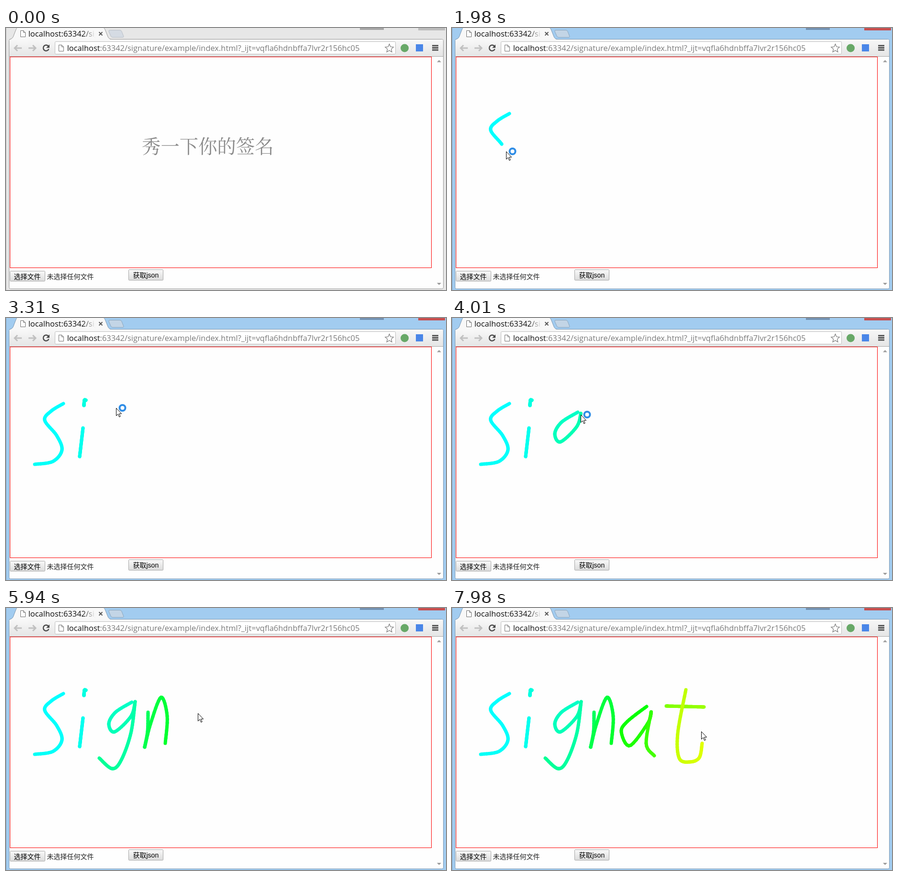
These frames come from a looping animation (920 by 548 pixels, 8000 ms). An HTML page with a canvas:

```html
<!DOCTYPE html>
<html lang="zh">
<head>
<meta charset="utf-8">
<title>Signature pad</title>
<style>
  html, body { margin: 0; width: 100%; height: 100%; overflow: hidden; }
  #stage {
    --frame: #e7e7e7; --edge: #999; --side: #c4c4c4;
    --min: #a6a6a6; --close: #bcbcbc; --plus: #d5dbe3; --plusEdge: #b9bfc7;
    position: relative; width: 920px; height: 548px; overflow: hidden; background: var(--frame);
  }
  #stage.active {
    --frame: #a2ccf0; --edge: #7f9ab3; --side: #86a9c8;
    --min: #7392b3; --close: #c75050; --plus: #c3d5e6; --plusEdge: #8ba5bd;
  }
  #stage.active #hint { display: none; }
  svg, canvas { position: absolute; left: 0; top: 0; }
  .ui { font: 16.46px "Open Sans", "Noto Sans", sans-serif; }
  .form { font: 14px "Liberation Sans", "Noto Sans CJK SC", sans-serif; }
  #hint { font: 39.4px "Noto Serif CJK SC", "Noto Sans CJK SC", serif; fill: #8a8a8a; }
  .btn { fill: url(#btnFill); stroke: #a5a5a5; }
</style>
</head>
<body>
<div id="stage">
  <svg width="920" height="548" viewBox="0 0 920 548">
    <defs>
      <linearGradient id="bar" x2="0" y2="1">
        <stop offset="0" stop-color="#f8f8f8"/><stop offset="1" stop-color="#e5e5e5"/>
      </linearGradient>
      <linearGradient id="btnFill" x2="0" y2="1">
        <stop offset="0" stop-color="#f9f9f9"/><stop offset="1" stop-color="#dcdcdc"/>
      </linearGradient>
      <linearGradient id="fade" gradientUnits="userSpaceOnUse" x1="160" x2="187" y1="0" y2="0">
        <stop offset="0" stop-color="#111"/><stop offset="1" stop-color="#111" stop-opacity="0"/>
      </linearGradient>
      <clipPath id="tabClip"><rect x="40" width="147" height="24"/></clipPath>
      <g id="page" fill="#fff" stroke="#707070">
        <path d="M.5.5h6l4 4v9h-10z"/><path d="M6.5.5v4h4" fill="none"/>
      </g>
      <path id="arrow" d="M0 0h15M6-6L0 0l6 6" fill="none" stroke="#c0c0c0" stroke-width="3"/>
    </defs>

    <rect width="1" height="548" style="fill:var(--side)"/>
    <rect x="740" width="50" height="4" style="fill:var(--min)"/>
    <rect x="862" width="56" height="5" style="fill:var(--close)"/>

    <!-- window, toolbar and tab -->
    <rect x="6.5" y="23.5" width="908" height="522" rx="3" fill="#fefefe" style="stroke:var(--edge)"/>
    <path d="M7 59V27q0-3 3-3h901q3 0 3 3v32z" fill="url(#bar)"/>
    <path d="M7 24.5C14 23 15 20 17 14L21 3Q22 0 24 -1H203Q206 0 207 3L213 18Q215 23 220 24.5z" fill="#f8f8f8"/>
    <path d="M7 24C14 22 15 19 17 13L21 3Q22 0 24 -1M203 -1Q206 0 207 3L213 18Q215 23 220 23.5" fill="none" style="stroke:var(--edge)"/>
    <path d="M217 4.5h21q3 0 4 3l4 10q0 2-2 2h-21q-3 0-4-3l-4-9q-1-3 2-3z" style="fill:var(--plus);stroke:var(--plusEdge)"/>
    <path d="M7 59.5H914" stroke="#a8a8a8"/>
    <use href="#page" x="30" y="5"/>
    <text class="ui" x="46.7" y="18" fill="url(#fade)" clip-path="url(#tabClip)">localhost:63342/signature</text>
    <path d="M194.5 8.5l7 7m0-7l-7 7" stroke="#555" stroke-width="1.8"/>

    <use href="#arrow" x="18" y="42"/>
    <use href="#arrow" transform="translate(62 42) scale(-1 1)"/>
    <path d="M89 38.5A6 6 0 1 0 89.5 44" fill="none" stroke="#4a4a4a" stroke-width="2.4"/>
    <path d="M91 34.5v7h-7z" fill="#4a4a4a"/>
    <rect x="102.5" y="28.5" width="712" height="26" rx="2" fill="#fff" stroke="#bdbdbd"/>
    <use href="#page" x="110" y="35"/>
    <text class="ui" x="127.7" y="48" fill="#111">localhost<tspan fill="#7a7a7a">:63342/signature/example/index.html?_ijt=vqfla6hdnbffa7lvr2r156hc05</tspan></text>
    <path d="M801.5 33.5l2.5 5.800 6.200.6-4.700 4.200 1.400 6.100-5.400-3.200-5.400 3.200 1.400-6.100-4.700-4.200 6.200-.6z" fill="#fff" stroke="#777" stroke-width="1.2"/>
    <circle cx="833.5" cy="42" r="8.5" fill="#67a867"/>
    <rect x="857" y="34" width="15" height="15" fill="#4a86e8"/>
    <path d="M891 37h13m-13 4.500h13m-13 4.500h13" stroke="#505050" stroke-width="2.8"/>

    <!-- page -->
    <path d="M901 71.5l4.500-4.500 4.500 4.500zM901 533l4.500 4.500 4.500-4.500z" fill="#9b9b9b"/>
    <rect x="8.5" y="60.5" width="881" height="441" fill="none" stroke="#f00"/>
    <text id="hint" x="284" y="262">秀一下你的签名</text>
    <g class="form">
      <rect class="btn" x="8.5" y="508.5" width="73" height="21" rx="1"/>
      <text x="16.5" y="524.5">选择文件</text>
      <text x="85.5" y="524.5" fill="#222">未选择任何文件</text>
      <rect class="btn" x="256.5" y="505.5" width="72" height="22" rx="1"/>
      <text x="265.5" y="522">获取json</text>
    </g>
  </svg>

  <canvas id="ink" width="920" height="548"></canvas>

  <svg width="920" height="548" viewBox="0 0 920 548">
    <g id="cursor">
      <path d="M.5.5v16l3.700-3.500 2.600 6 2.400-1-2.600-5.800h5z" fill="#fff" stroke="#000"/>
      <circle id="busy" cx="13.5" cy="0" r="6" fill="#fff" stroke="#2f8de6" stroke-width="4"/>
    </g>
  </svg>
</div>

<script>
const LOOP = 8000, LAG = 57;
const ENTER = 1060, PRESS = 1640, IDLE = 4400;
const $ = id => document.getElementById(id);
const stage = $('stage'), cursor = $('cursor'), busy = $('busy');
const ctx = $('ink').getContext('2d');
ctx.lineCap = 'round';
ctx.lineWidth = 7;

const clamp = u => Math.min(1, Math.max(0, u));

// Catmull-Rom curve through a few points, u from 0 to 1.
function curve(pts, u) {
  const last = pts.length - 1;
  const i = Math.min(Math.floor(u * last), last - 1), f = u * last - i;
  const at = k => pts[Math.min(last, Math.max(0, k))];
  const [a, b, c, d] = [at(i - 1), at(i), at(i + 1), at(i + 2)];
  return [0, 1].map(k => b[k] + f / 2 * (c[k] - a[k]
    + f * (2 * a[k] - 5 * b[k] + 4 * c[k] - d[k] + f * (3 * (b[k] - c[k]) + d[k] - a[k]))));
}

// Each move is one curve of the pointer between two times; a pen move leaves ink.
const moves = [];
const move = (pen, t0, t1, path) =>
  moves.push({ pen, t0, t1, pts: path.split(' ').map(p => p.split(',').map(Number)) });
const write = (...args) => move(true, ...args);

write(1590, 2280, '120,179 94,195 81,214 106,246 117,276 98,300 60,306');
write(2535, 2628, '161,230 154,290');
write(2900, 3010, '163,183 164,172 167,172');
write(3490, 3970, '263,197 229,218 215,242 227,259 261,227 270,196');
write(4000, 4330, '270,196 261,262 241,318 222,336 195,314');
write(5050, 5620, '297,218 296,258 290,291 302,243 324,187 337,226 333,283');
write(6020, 6690, '407,206 367,237 354,259 372,288 410,240 416,219 406,284 423,309');
write(7150, 7390, '448,205 527,207');
write(7660, 7923, '489,171 472,262 475,314 497,322 517,313 523,283');

// Waypoints of the lifted pen; between strokes the pointer glides straight.
const hover = (t, p) => move(false, t, t, p);
hover(1060, '262,340');
hover(1570, '121,179');
hover(4720, '336,202');
hover(5940, '401,220');
hover(6830, '436,294');
hover(7060, '463,212');
hover(7980, '521,258');
moves.sort((a, b) => a.t0 - b.t0);

function pointer(t) {
  const i = Math.max(0, moves.findLastIndex(m => m.t0 <= t));
  const m = moves[i], next = moves[i + 1];
  if (t < m.t1) return curve(m.pts, clamp((t - m.t0) / (m.t1 - m.t0)));
  const from = m.pts.at(-1);
  if (!next) return from;
  return curve([from, next.pts[0]], clamp((t - m.t1) / (next.t0 - m.t1)));
}

// The colour drifts from cyan to yellow, faster as time goes on.
const hue = t => 180 - 113 * clamp((t - 1590) / 6333) ** 1.8;

function paint({ t0, t1, pts }, t) {
  const end = clamp((t - t0) / (t1 - t0)), step = 1 / 48;
  for (let u = 0; u < end; u += step) {
    ctx.strokeStyle = `hsl(${hue(t0 + u * (t1 - t0))} 100% 50%)`;
    ctx.beginPath();
    ctx.moveTo(...curve(pts, u));
    ctx.lineTo(...curve(pts, Math.min(u + step, end)));
    ctx.stroke();
  }
}

function draw(t) {
  stage.classList.toggle('active', t >= PRESS);
  cursor.style.display = t >= ENTER ? '' : 'none';
  busy.style.display = t >= PRESS && t < IDLE ? '' : 'none';
  const [x, y] = pointer(t).map(Math.round);
  cursor.setAttribute('transform', `translate(${x} ${y})`);
  ctx.clearRect(0, 0, 920, 548);
  for (const m of moves) if (m.pen) paint(m, t - LAG);
}

const start = performance.now();
function tick() {
  draw((performance.now() - start) % LOOP);
  requestAnimationFrame(tick);
}
tick();
</script>
</body>
</html>
```
